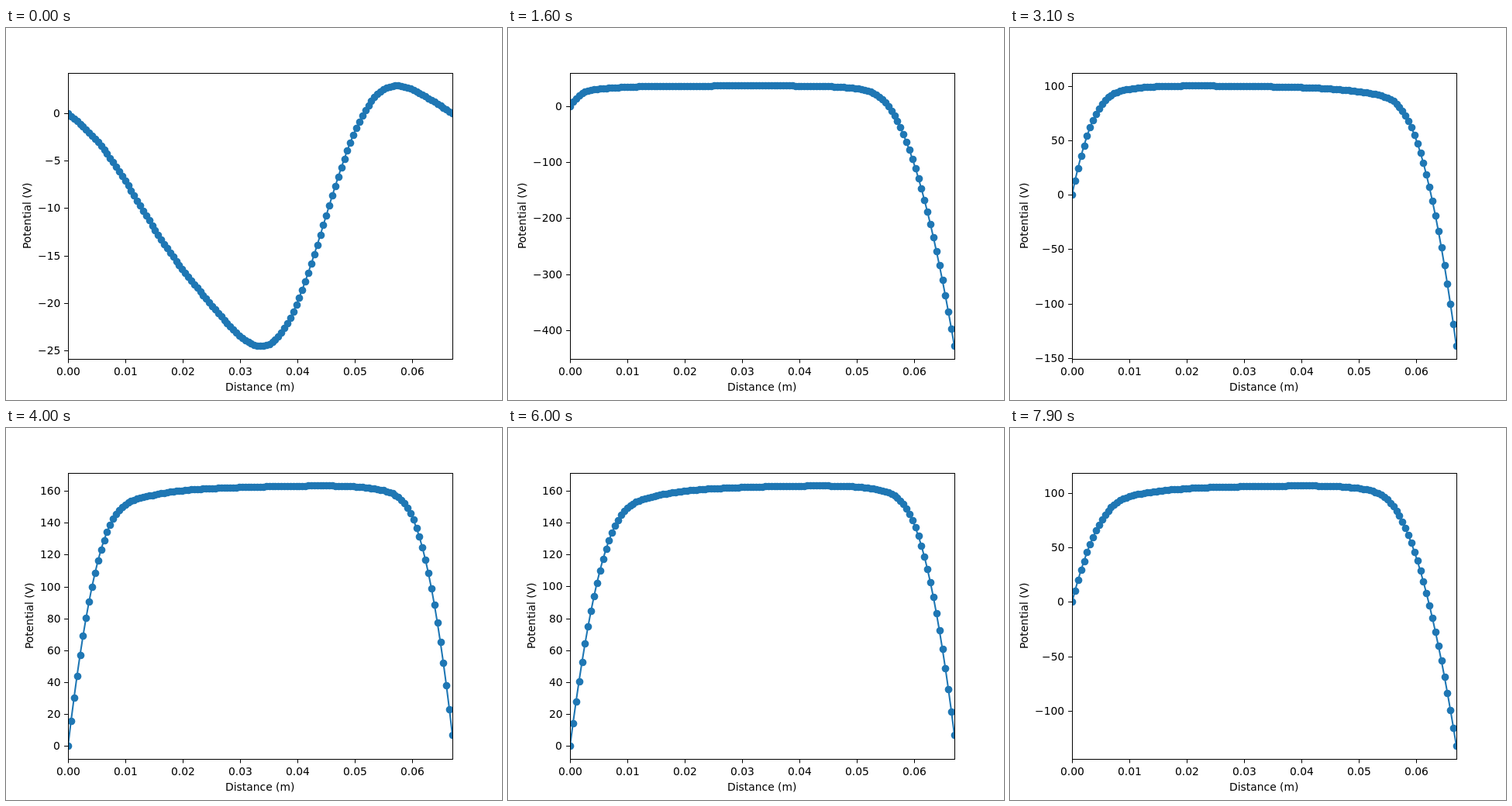
These frames come from a looping animation (640x480 px, 8 s). An HTML page with a canvas:

```html
<!DOCTYPE html>
<html lang="en">
<head>
<meta charset="utf-8">
<title>Potential between two electrodes</title>
<style>
html, body { margin: 0; width: 100%; height: 100%; overflow: hidden; background: #fff; }
canvas { display: block; }
</style>
</head>
<body>
<canvas id="plot" width="640" height="480"></canvas>
<script>
const ctx = document.getElementById('plot').getContext('2d');
const BLUE = '#1f77b4', CELLS = 128, GAP = 0.067, FRAMES = 80;
const LEFT = 80, RIGHT = 576, TOP = 57.6, BOTTOM = 427.2;
const CYCLE = 400, STRIDE = 20, PEAK = 450; // steps per drive period, steps per frame, volts

// Before the drive starts: a few standing waves between the walls
const WAVES = [-17.7, -5.18, 6.35, -1.23, -0.52, 0.95];
const atRest = k => WAVES.reduce((v, amp, m) => v + amp * Math.sin((m + 1) * Math.PI * k / CELLS), 0);

// Voltage drop by distance from a wall, in cells: a rounded parabola plus a faint tail
function sheath(volts, curve, presheath) {
  const p = Math.min(presheath, volts / 3), width = 3 + p / 3;
  const edge = Math.sqrt(2 * volts / curve);
  const tail = k => p / (1 + Math.exp((k - edge) / width));
  const depth = Math.sqrt(2 * (volts - tail(0)) / curve);
  const soft = Math.min(3.5, depth / 4);
  const knee = soft * Math.log(Math.exp(depth / soft) - 1);
  return k => curve / 2 * (soft * Math.log(1 + Math.exp((knee - k) / soft))) ** 2 + tail(k);
}

function profile(n) {
  const cells = [...Array(CELLS + 1).keys()];
  if (n === 0) return cells.map(atRest);

  const step = n * STRIDE + (n >= 36 ? 1 : 0);
  const phase = 2 * Math.PI * step / CYCLE;
  const swing = Math.sin(phase), lean = Math.cos(phase);
  const wall = PEAK * swing;

  // The square roots of both sheath voltages add up to this sum
  const settle = n <= 10 ? 4.7 - 17 * Math.exp(-n / 2) : 4.6 * Math.exp((10 - n) / 3);
  const sum = 25 + 0.2 * lean + 2 * Math.abs(swing) + settle;
  const plasma = ((sum * sum + wall) / (2 * sum)) ** 2;

  const curve = 1.25 * Math.exp(-n / 115);
  const dropL = sheath(plasma, curve * (1 - 0.03 * lean), 13 + 4 * lean);
  const dropR = sheath(plasma - wall, curve * (1 + 0.03 * lean), 13 - 4 * lean);
  const tilt = k => 0.75 * lean * Math.sin(2 * Math.PI * k / CELLS);
  return cells.map(k => k === 0 ? 0 : k === CELLS ? wall :
    plasma - dropL(k) - dropR(CELLS - k) - tilt(k));
}

function tickStep(range) {
  const raw = range / 9, mag = 10 ** Math.floor(Math.log10(raw));
  return mag * [1, 2, 2.5, 5, 10].find(s => s * mag >= raw);
}

function line(x1, y1, x2, y2) {
  ctx.beginPath();
  ctx.moveTo(x1, y1);
  ctx.lineTo(x2, y2);
  ctx.stroke();
}

// Text on whole pixels; align is the share of the width left of x
function text(str, x, y, align) {
  const width = ctx.measureText(str).width;
  ctx.fillText(str, Math.round(x - width * align), Math.round(y));
  return width;
}

function drawCurve(data, px, py) {
  ctx.save();
  ctx.beginPath();
  ctx.rect(LEFT, 58, RIGHT - LEFT, 369);
  ctx.clip();
  ctx.strokeStyle = ctx.fillStyle = BLUE;
  ctx.lineWidth = 2.08;
  ctx.lineJoin = 'round';
  ctx.beginPath();
  data.forEach((v, k) => ctx.lineTo(px(k), py(v)));
  ctx.stroke();
  data.forEach((v, k) => {
    ctx.beginPath();
    ctx.arc(Math.round(px(k)) + 0.5, Math.round(py(v)) + 0.5, 4.86, 0, 2 * Math.PI);
    ctx.fill();
  });
  ctx.restore();
}

function draw(n) {
  const data = profile(n);
  const min = Math.min(...data), max = Math.max(...data), pad = (max - min) * 0.05;
  const lo = min - pad, hi = max + pad;
  const px = k => LEFT + (RIGHT - LEFT) * k / CELLS;
  const py = v => BOTTOM - (BOTTOM - TOP) * (v - lo) / (hi - lo);

  ctx.fillStyle = '#fff';
  ctx.fillRect(0, 0, 640, 480);
  drawCurve(data, px, py);

  ctx.strokeStyle = ctx.fillStyle = '#000';
  ctx.lineWidth = 1;
  ctx.strokeRect(80.5, 58.5, 496, 369);
  ctx.font = '13.89px "DejaVu Sans", sans-serif';

  for (let d = 0; d < GAP; d += 0.01) {
    const x = px(CELLS * d / GAP), xs = Math.round(x) + 0.5;
    line(xs, 427, xs, 432.4);
    text(d.toFixed(2), x, 448, 0.5);
  }
  text('Distance (m)', 328, 468, 0.5);

  const step = tickStep(hi - lo);
  let widest = 0;
  for (let i = Math.ceil(lo / step); i * step <= hi; i++) {
    const y = Math.round(py(i * step));
    const label = (i < 0 ? '\u2212' : '') + Math.abs(i * step);
    line(75.1, y + 0.5, 80, y + 0.5);
    widest = Math.max(widest, text(label, 70.3, y + 5, 1));
  }

  ctx.save();
  ctx.translate(Math.round(70.3 - widest - 8.9), 242);
  ctx.rotate(-Math.PI / 2);
  text('Potential (V)', 0, 0, 0.5);
  ctx.restore();
}

const begin = performance.now();
let shown = -1;
function tick() {
  const n = Math.floor((performance.now() - begin) / 100) % FRAMES;
  if (n !== shown) draw(shown = n);
  requestAnimationFrame(tick);
}
tick();
</script>
</body>
</html>
```
